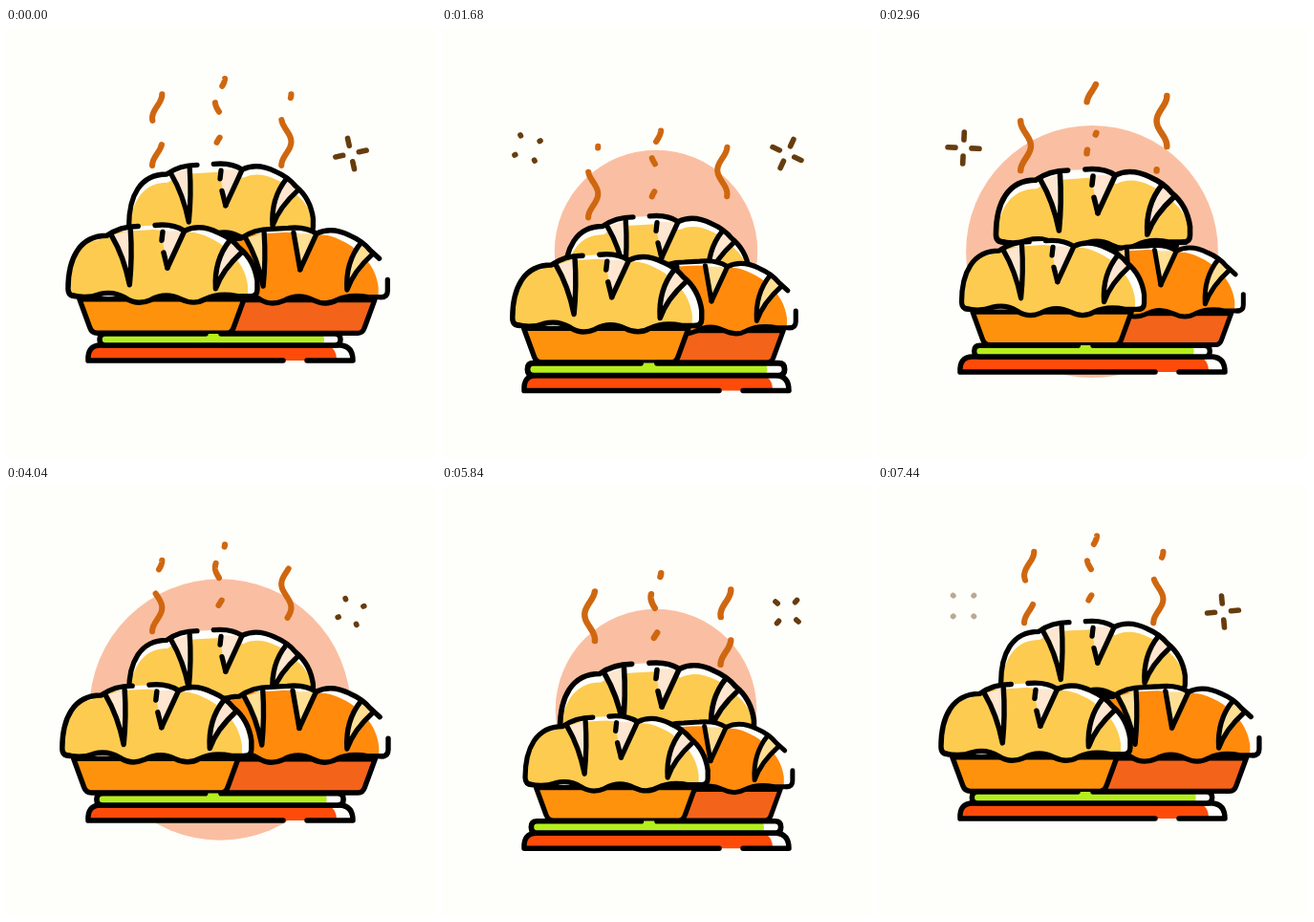
An HTML page with a canvas that plays this animation: 450x450 px, repeating every 7.48 s.

```html
<!DOCTYPE html>
<html>
<head>
<meta charset="utf-8">
<title>Fresh bread</title>
<style>
html, body { margin: 0; width: 100%; height: 100%; overflow: hidden; background: #fefefa; }
canvas { display: block; }
</style>
</head>
<body>
<canvas id="stage" width="450" height="450"></canvas>
<script>
const g = document.getElementById('stage').getContext('2d');
const LOOP = 7480, PAPER = '#fefefa', INK = '#000';
const path = d => new Path2D(d);
const clamp = (v, a, b) => Math.min(b, Math.max(a, v));
const frac = v => v - Math.floor(v);

// One loaf; every bread on the plate is this shape, scaled.
const left = 'M73 280Q65 280 65 272C65 240 77 216 106 216Q120 206 139 206';
const crown = 'Q176 203 188 211Q204 203 224 213Q238 219 246 229';
const side = 'Q262 242 265 264V273Q265 280 258 280';
const shell = path(left + 'L157 205' + crown + side + 'H244Q224 276 210 283Q198 290 184 283Q168 275 152 284Q138 290 126 282Q113 274 98 278Q86 281 73 280Z');
const lip = path('M69 279Q85 283 98 278Q113 274 126 282Q138 290 152 284Q168 275 184 283Q198 290 210 283Q224 276 244 280H260');
const openTop = path(left + 'M157 205' + crown + side);
const openSide = path(left + 'L157 205' + crown + 'L256 238M265 261V273Q265 280 258 280');
const cup = path('M77 283L88 313Q90 319 96 319H233Q238 319 240 313L251 283Z');
const cuts = path('M111 216L130 268L131 210ZM163 211L170 250L188 211ZM236 221Q220 242 221 272L249 233Z');
const cutLines = path('M111 216Q124 238 130 268Q133 238 131 210M170 250L188 211M236 221Q219 242 221 272Q228 252 249 233');
const cutDashed = path('M165 212L164 221M166 234L170 250');
const cutSolid = path('M163 210L170 250');

function line(p, width = 5.5, color = INK) {
  g.lineWidth = width;
  g.strokeStyle = color;
  g.stroke(p);
}

function fill(p, color) {
  g.fillStyle = color;
  g.fill(p);
}

function bread(x, y, s, anchor, o) {
  g.save();
  g.translate(x, y);
  g.scale(s, s);
  g.translate(-165.5, -anchor);
  fill(cup, o.cup);
  line(cup);
  fill(shell, PAPER);
  g.save();
  g.clip(shell);
  g.translate(o.dx, o.dy);
  fill(shell, o.crust);
  g.restore();
  fill(cuts, o.cut);
  line(lip);
  line(o.solid ? openSide : openTop);
  line(cutLines);
  line(o.solid ? cutSolid : cutDashed);
  g.restore();
}

const backLook = { crust: '#fdcb50', cup: '#f07d10', cut: '#fee6d0', dx: 1, dy: 9 };
const leftLook = { crust: '#fdcb50', cup: '#ff920c', cut: '#fee6d0', dx: -10, dy: 5 };
const rightLook = { crust: '#ff8a0c', cup: '#f4631a', cut: '#ffdf94', dx: -10, dy: 5, solid: true };

// A dash running up a wavy path between heights h0 and h0 + len.
function wisp(cx, origin, h0, len, dash, phase) {
  const start = frac(phase);
  for (const a of [start, start - 1]) {
    const from = clamp(a, 0, 1), to = clamp(a + dash, 0, 1);
    if (to <= from) continue;
    const p = new Path2D();
    for (let i = 0; i <= 24; i++) {
      const h = h0 + len * (from + (to - from) * i / 24);
      p.lineTo(cx - 5 * Math.cos(Math.PI * (h - origin) / 24.3), -h);
    }
    line(p, 6, '#cf6710');
  }
}

function steam(y, s, t) {
  g.save();
  g.translate(225.5, y);
  g.scale(s, s);
  g.translate(-225.5, 0);
  wisp(159.5, 0, 0, 73, 0.66, 0.63 + 6 * t);
  wisp(292, 0, 0, 73, 0.69, 0.95 + 6 * t);
  wisp(224, 17, 17, 20, 0.25, 0.33 + 4 * t);
  wisp(224, 17, 55, 34, 0.5, 0.775 + 4 * t);
  g.restore();
}

// Sparkle keys: time, angle, inner radius, outer radius, opacity
const keys = [
  [0, 12, 4, 5, 0], [100, 14, 6, 6.8, .4], [440, 25, 8.5, 16.5, 1], [590, -5, 8.5, 16.5, 1],
  [800, -42, 8.5, 16.5, 1], [860, -48, 13, 16, 1], [930, -113, 14, 15, 1],
  [1140, -119, 14.5, 15.5, 1], [1290, -135, 15, 15.5, .45], [1330, -135, 15, 15.5, 0]
];

function sparkle(x, y, ms) {
  const time = ms % (LOOP / 4);
  const i = keys.findIndex(k => k[0] > time);
  if (i < 1) return;
  const a = keys[i - 1], b = keys[i], u = (time - a[0]) / (b[0] - a[0]);
  const [angle, inner, outer, alpha] = [1, 2, 3, 4].map(n => a[n] + (b[n] - a[n]) * u);
  g.save();
  g.globalAlpha = alpha;
  g.translate(x, y);
  g.rotate(angle * Math.PI / 180);
  for (let n = 0; n < 4; n++) {
    line(path(`M${inner} 0H${outer}`), 5.6, '#663c0e');
    g.rotate(Math.PI / 2);
  }
  g.restore();
}

function plate(dy, s) {
  g.save();
  g.translate(0, dy);
  fill(path('M86 348Q85 332 99 332H350Q363 333 363 348Z'), PAPER);
  fill(path('M86 348Q85 332 99 332H335Q346 334 346 348Z'), '#ff4b0a');
  line(path('M290 348H86Q85 332 99 332H350Q363 333 363 348H315'));
  g.translate(224, 332);
  g.scale(s, s);
  const bar = 'M-15 -12H-120Q-126 -12 -126 -6Q-126 0 -120 0H120Q126 0 126 -6Q126 -12 120 -12';
  fill(path(bar + 'Z'), PAPER);
  fill(path('M-120 -12H103Q109 -12 109 -6Q109 0 103 0H-120Q-126 0 -126 -6Q-126 -12 -120 -12Z'), '#b4ee1c');
  line(path(bar + 'H1'));
  g.restore();
}

function draw(ms) {
  const t = ms / LOOP;
  const swing = shift => Math.cos(4 * Math.PI * (t - shift));
  const dy = 16.2 * (1 - swing(0));
  const barScale = (129.5 + 6.5 * swing(.17)) / 126;
  const baseY = 332 + dy - 12.7 * barScale;
  const sway = swing(.34);
  const v = clamp((sway - .1) / .7, 0, 1), swell = v * v * (3 - 2 * v);
  const backScale = 1.02 + .055 * swell, backY = 240 + 28.3 * swing(.22);

  g.fillStyle = PAPER;
  g.fillRect(0, 0, 450, 450);
  g.lineCap = g.lineJoin = 'round';

  g.fillStyle = '#fabfa2';
  g.beginPath();
  g.arc(224, 234, 110.5 - 27 * Math.cos(2 * Math.PI * t), 0, 2 * Math.PI);
  g.fill();

  sparkle(89.5, 125.5, ms + 1330);
  sparkle(361, 131.5, ms + 630);
  steam(backY - 68.5 * backScale, backScale, t);
  bread(225.5, backY, .945 * backScale, 279, backLook);
  bread(290 + 13.5 * swing(.01), baseY, .94 + .045 * swing(.08), 319, rightLook);
  bread(171.3 + 16 * sway, baseY, .99 - .035 * swell, 319, leftLook);
  plate(dy, barScale);
}

const begin = performance.now();
function tick() {
  draw((performance.now() - begin) % LOOP);
  requestAnimationFrame(tick);
}
tick();
</script>
</body>
</html>
```
